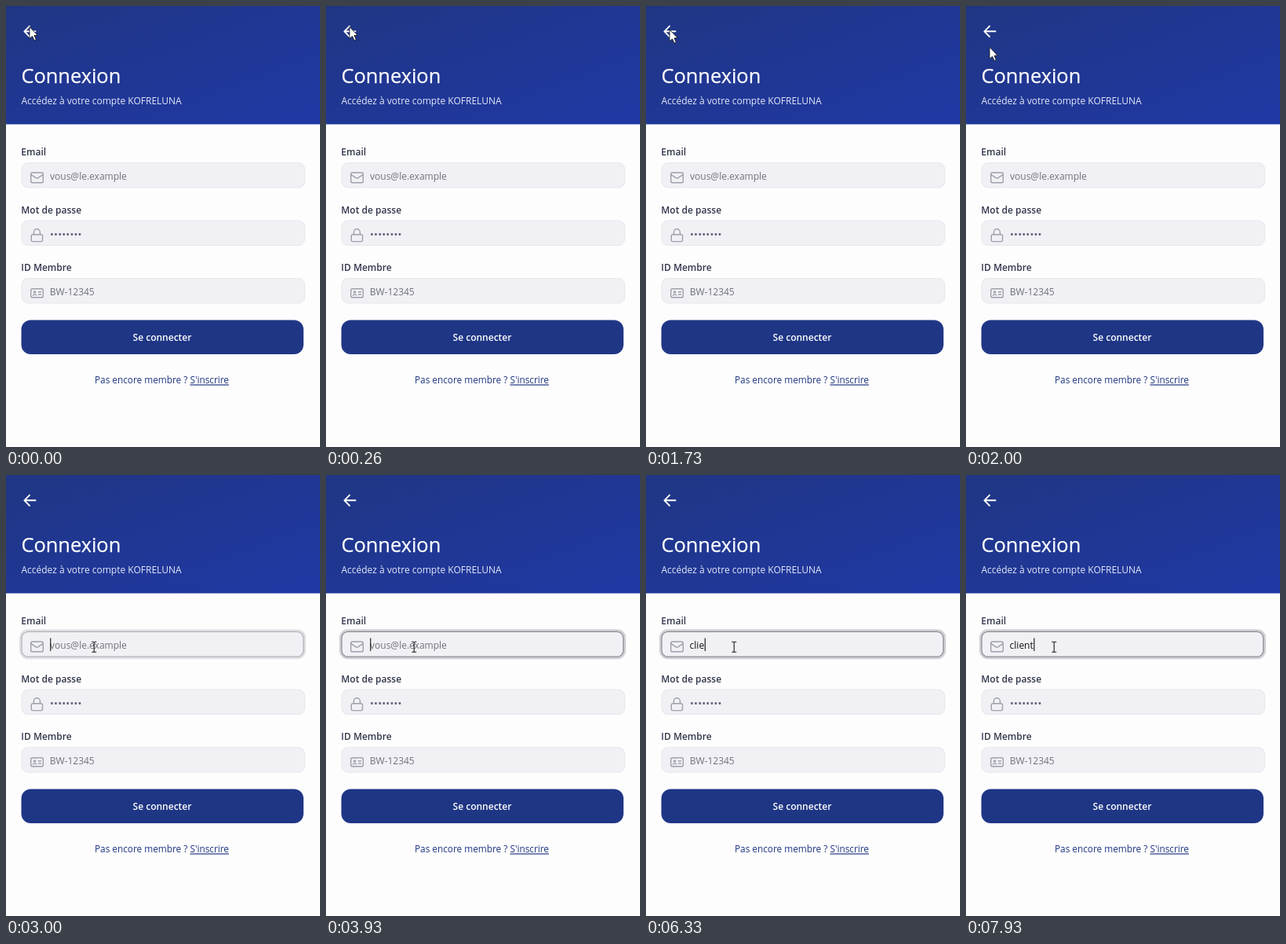
These frames come from a looping animation (400x561 px, 8000 ms). An HTML page:

```html
<!DOCTYPE html>
<html lang="fr">
<head>
<meta charset="utf-8">
<title>Connexion</title>
<style>
  html, body { margin: 0; width: 100%; height: 100%; overflow: hidden; background: #fefdfe; }
  svg { display: block; position: absolute; left: 0; top: 0; }
  text { font: 12px "Open Sans", "Noto Sans", sans-serif; fill: #6f727b; white-space: pre; }
  .title { font-size: 25.4px; fill: #fff; stroke: #fff; stroke-width: .25; }
  .sub { fill: #e4e9f8; }
  .label { font-weight: 600; fill: #30364a; }
  .button { font-weight: 600; fill: #fff; text-anchor: middle; }
  .foot { font-size: 11.8px; fill: #1e3680; }
  .dots { font-size: 13px; letter-spacing: .2px; fill: #5f627c; }
  .typed { fill: #101014; }
  .box { fill: #f1f1f5; stroke: #e6e6eb; }
  .icon { fill: none; stroke: #9da0ab; stroke-width: 1.4; stroke-linecap: round; stroke-linejoin: round; }
  .back { fill: none; stroke: #fff; stroke-width: 1.9; stroke-linecap: round; stroke-linejoin: round; }
</style>
</head>
<body>
<svg width="400" height="561" viewBox="0 0 400 561">
  <defs>
    <linearGradient id="blue" gradientUnits="userSpaceOnUse" x1="151" y1="-56" x2="249" y2="206">
      <stop offset="0" stop-color="#203684"/>
      <stop offset="1" stop-color="#2038a5"/>
    </linearGradient>
  </defs>

  <rect width="400" height="150.5" fill="url(#blue)"/>
  <path class="back" d="M37.5 32.3H23.5M30 25.6L23.4 32.3L30 39"/>
  <text class="title" x="19.4" y="98">Connexion</text>
  <text class="sub" x="19.5" y="124.7">Accédez à votre compte KOFRELUNA</text>

  <text class="label" x="19.3" y="190">Email</text>
  <text class="label" x="19.3" y="263.5">Mot de passe</text>
  <text class="label" x="19.3" y="337">ID Membre</text>

  <rect class="box" x="20" y="199.5" width="360.5" height="31.5" rx="8"/>
  <rect class="box" x="20" y="273" width="360.5" height="31.5" rx="8"/>
  <rect class="box" x="20" y="346.5" width="360.5" height="31.5" rx="8"/>
  <g id="focus" fill="none">
    <rect x="18.5" y="197.8" width="362" height="35" rx="9.5" stroke="#cfcfd4" stroke-width="3"/>
    <rect x="20" y="199.3" width="358.7" height="31.9" rx="8" fill="#f1f1f5" stroke="#8b8b93" stroke-width="1.2"/>
  </g>

  <g class="icon">
    <rect x="31.7" y="212" width="15.6" height="12.8" rx="1.8"/>
    <path d="M32 214.6L38.4 218.8Q39.5 219.5 40.6 218.8L47 214.6"/>
    <rect x="32.3" y="290.8" width="14.2" height="8.8" rx="1.8"/>
    <path d="M35.4 290.6V287.8a4 4 0 0 1 8 0V290.6"/>
    <rect x="31.7" y="359.8" width="15.6" height="11" rx="1.8"/>
    <circle cx="36.5" cy="364" r="1.1"/>
    <path d="M34.4 368.1Q36.5 365.7 38.6 368.1M41.4 363.8H44.4M41.4 367H44.4"/>
  </g>

  <text id="hint" x="56" y="220.5">vous@le.example</text>
  <text id="typed" class="typed" x="55.6" y="220.5"></text>
  <text class="dots" x="56" y="295">••••••••</text>
  <text x="55.8" y="367.5">BW-12345</text>

  <rect x="19.5" y="399.6" width="359.5" height="43.4" rx="12" fill="#1f3685"/>
  <text class="button" x="199" y="426">Se connecter</text>
  <text class="foot" x="113" y="480.4">Pas encore membre ? <tspan text-decoration="underline">S'inscrire</tspan></text>

  <rect id="caret" y="207.5" width="1.1" height="16.5" fill="#111"/>
  <path id="arrow" fill="#fff" stroke="#15151d" stroke-width=".9" stroke-linejoin="round"
    d="M0 0V15L3.5 11.9L6 17.3L8.4 16.2L6 10.9L10.2 10.6Z"/>
  <path id="beam" fill="none" stroke="#1d1d22" stroke-width="1.1"
    d="M-3 -6.5H-1Q0 -6.5 0 -5.5V5.5Q0 6.5 -1 6.5H-3M3 -6.5H1Q0 -6.5 0 -5.5V5.5Q0 6.5 1 6.5H3"/>
</svg>

<script>
  const LOOP = 8000;
  const $ = id => document.getElementById(id);

  // Each row: start time in ms, then the value held until the next row.
  const pointer = [
    [0, [30, 26.5]], [1730, [30, 30]], [1800, [30, 38]], [1860, [30, 46]], [2000, [30, 52.3]],
    [2260, [39, 72]], [2330, [68, 130]], [2400, [100, 196]], [2460, [112.2, 218.8]]
  ];
  const focus = [[0, 0], [3000, .6], [3060, 1]];
  const caret = [[0, 0], [3000, 1], [3530, 0], [3930, 1], [4530, 0], [5400, 1]];
  const typing = [[0, 0], [4200, 1], [5660, 2], [6000, 3], [6330, 4], [6400, 5], [6460, 6]];
  const word = "client";

  const at = (steps, t) => steps.findLast(([start]) => start <= t)[1];
  const show = (el, on) => el.style.display = on ? "" : "none";

  function draw(t) {
    const [x, y] = at(pointer, t);
    const inField = y > 199;
    for (const id of ["arrow", "beam"]) {
      $(id).setAttribute("transform", `translate(${x} ${y})`);
      show($(id), (id === "beam") === inField);
    }

    const count = at(typing, t);
    const typed = $("typed");
    typed.textContent = word.slice(0, count);
    show($("hint"), !count);

    $("focus").style.opacity = at(focus, t);
    $("caret").setAttribute("x", 56.2 + (count ? typed.getComputedTextLength() : 0));
    show($("caret"), at(caret, t));
  }

  const begin = performance.now();
  function tick() {
    draw((performance.now() - begin) % LOOP);
    requestAnimationFrame(tick);
  }
  tick();
</script>
</body>
</html>
```
